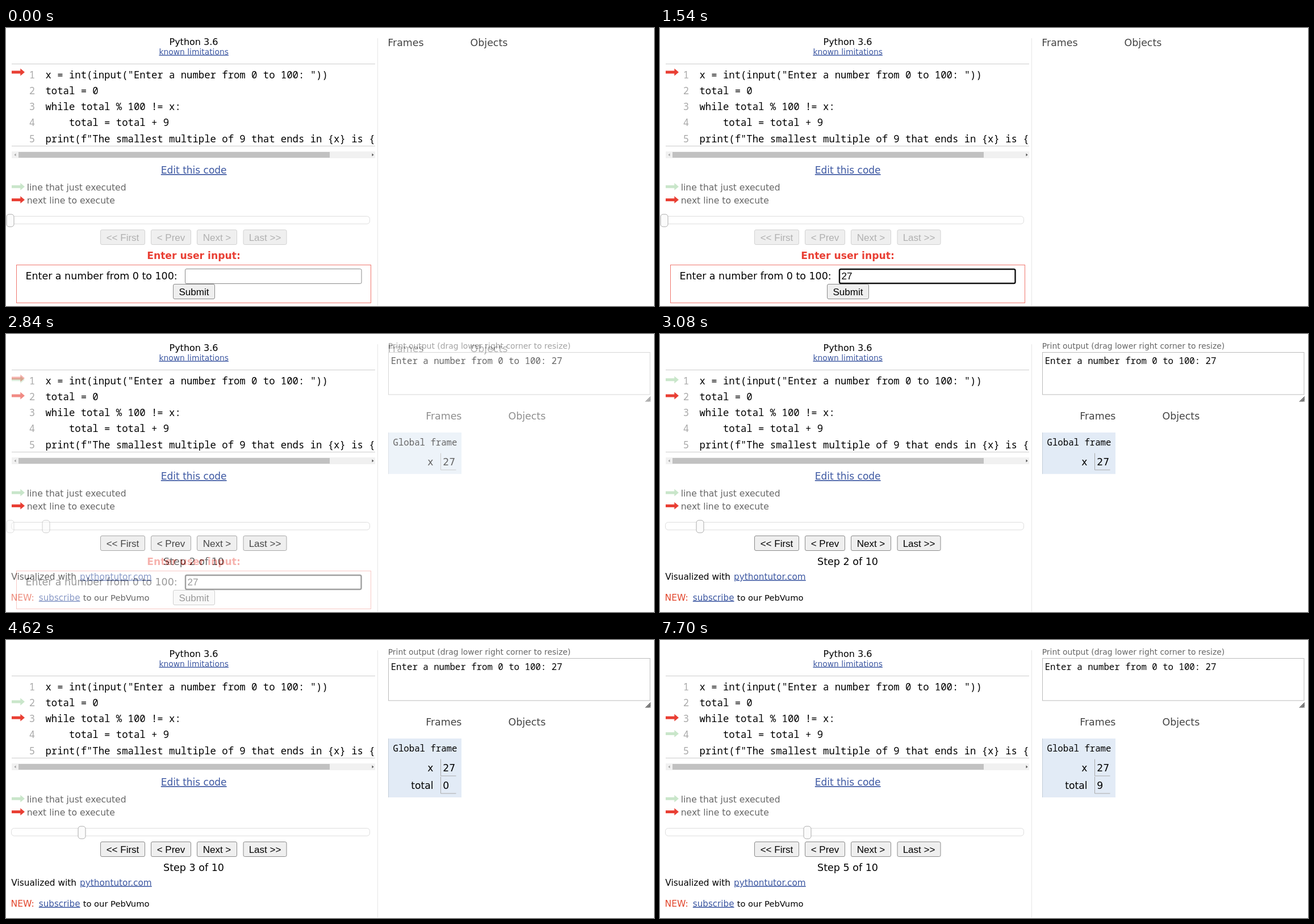
Write an HTML page that moves like this. It is 1141x491 px and loops after 8 s.

```html
<!DOCTYPE html>
<html lang="en">
<head>
<meta charset="utf-8">
<title>Stepping through a while loop</title>
<style>
  html, body { margin: 0; width: 100%; height: 100%; overflow: hidden; background: #fff; }
  svg { display: block; width: 1141px; height: 491px; }
  text { font-family: "DejaVu Sans", Verdana, sans-serif; white-space: pre; }
  .mono { font-family: "Noto Sans Mono", "DejaVu Sans Mono", monospace; }
  .ui { font-family: "Liberation Sans", Arial, sans-serif; }
  .link { fill: #3d58a2; text-decoration: underline; text-decoration-thickness: 1px; text-underline-offset: 1px; }
</style>
</head>
<body>
<svg id="stage" viewBox="0 0 1141 491"></svg>
<script>
const LOOP = 8000, FADE = 600, FADE_STEPS = 10;
const RED = '#e93f34', GREEN = '#c9e6ca', INK = '#000', GREY = '#666';

// One entry per state; "at" is when its cross-fade begins.
const scenes = [
  { at: 0, step: 1, next: 1 },
  { at: 1000, step: 1, next: 1, typed: '27' },
  { at: 2540, step: 2, done: 1, next: 2, vars: [['x', 27]] },
  { at: 4080, step: 3, done: 2, next: 3, vars: [['x', 27], ['total', 0]] },
  { at: 5620, step: 4, done: 3, next: 4, vars: [['x', 27], ['total', 0]] },
  { at: 7160, step: 5, done: 4, next: 3, vars: [['x', 27], ['total', 9]] }
];

const code = [
  'x = int(input("Enter a number from 0 to 100: "))',
  'total = 0',
  'while total % 100 != x:',
  '    total = total + 9',
  'print(f"The smallest multiple of 9 that ends in {x} is {'
];

const esc = s => String(s).replace(/&/g, '&amp;').replace(/</g, '&lt;');

const text = (x, y, size, str, fill = INK, attrs = '') =>
  `<text x="${x}" y="${y}" font-size="${size}" fill="${fill}" ${attrs}>${esc(str)}</text>`;

const rect = (x, y, w, h, fill, stroke = 'none', r = 0, lineWidth = 1) =>
  `<rect x="${x}" y="${y}" width="${w}" height="${h}" rx="${r}" fill="${fill}" stroke="${stroke}" stroke-width="${lineWidth}"/>`;

const path = (d, stroke, fill = 'none') =>
  `<path d="${d}" stroke="${stroke}" fill="${fill}"/>`;

const arrow = (y, fill) =>
  path(`M10 ${y - 2.5}h15.3v-3.9l7.7 6.4l-7.7 6.4v-3.9h-15.3z`, 'none', fill);

const MID = 'text-anchor="middle"', END = 'text-anchor="end"';
const MONO = 'class="mono"', LINK = 'class="link"';

function button(x, y, w, label, off) {
  return rect(x + .5, y + .5, w - 1, 26, '#efefef', off ? '#d2d2d2' : '#8a8a8a', 2.5) +
    text(x + w / 2, y + 19.5, 17, label, off ? '#b0b0b0' : INK, `class="ui" ${MID}`);
}

function codePanel(s) {
  let out = text(330.5, 30, 16, 'Python 3.6', INK, MID) +
    text(330.7, 46.5, 13.85, 'known limitations', '', `${LINK} ${MID}`) +
    path('M10 63.5H650M10 208.5H650', '#ccc');
  code.forEach((line, i) => {
    const y = Math.round(88.6 + i * 28.25);
    out += text(51, y, 17.28, i + 1, '#aaa', `${MONO} ${END}`) +
      text(69.5, y, 17.28, line, INK, MONO);
  });
  const lineY = n => 52.6 + n * 28.2;
  if (s.done) out += arrow(lineY(s.done), GREEN);
  out += arrow(s.step === 1 ? 78 : lineY(s.next), RED);
  return out +
    rect(10, 218, 640, 12, '#f1f1f1') + rect(22, 219, 548, 10, '#c1c1c1') +
    path('M17.5 221.5v5l-3-2.5z', 'none', '#a3a3a3') +
    path('M644.5 221.5v5l3-2.5z', 'none', '#505050') +
    text(330.7, 257, 17, 'Edit this code', '', `${LINK} ${MID}`) +
    arrow(280.2, GREEN) + text(36.7, 286.5, 15.6, 'line that just executed', GREY) +
    arrow(303.4, RED) + text(36.7, 310, 15.6, 'next line to execute', GREY);
}

function controls(s) {
  const off = s.step === 1;
  return rect(9.5, 332.5, 631, 13.5, '#fff', '#ddd', 5) +
    rect(1 + (s.step - 1) * 63, 329, 13, 22, '#fbfbfb', '#aaa', 4.5) +
    button(166, 356, 79, '<< First', off) +
    button(255, 356, 71, '< Prev', off) +
    button(336, 356, 71, 'Next >', off) +
    button(417.5, 356, 77, 'Last >>', off);
}

function inputForm(s) {
  const box = s.typed
    ? rect(316, 426, 309.5, 25, '#fff', '#101010', 2.5, 2.4) +
      text(319.5, 444, 17, s.typed, INK, 'class="ui"')
    : rect(315.5, 425.5, 310.5, 26, '#fff', '#8a8a8a', 2.5);
  return text(330.5, 408, 17.2, 'Enter user input:', RED, `font-weight="bold" ${MID}`) +
    rect(18.5, 418.5, 624, 67, 'none', '#f0776e') +
    text(34.5, 444, 17.45, 'Enter a number from 0 to 100:') +
    box + button(294, 452, 74, 'Submit');
}

function credits(s) {
  return text(330.5, 408, 17.5, `Step ${s.step} of 10`, INK, MID) +
    text(9.3, 433.5, 15.35, 'Visualized with') +
    text(130, 433.5, 15.27, 'pythontutor.com', '', LINK) +
    text(8.5, 470.5, 15.6, 'NEW:', '#e2472d') +
    text(57.8, 470.5, 15.15, 'subscribe', '', LINK) +
    text(135.7, 470.5, 14.7, 'to our PebVumo');
}

const headings = (x, y) =>
  text(x, y, 17.4, 'Frames', '#444') + text(x + 145.3, y, 17.4, 'Objects', '#444');

function memory(s) {
  const height = 42.5 + 30.75 * s.vars.length;
  let out = text(672.7, 25.5, 13.9, 'Print output (drag lower right corner to resize)', GREY) +
    rect(673.5, 32.5, 460.5, 74.5, '#fff', '#bbb') +
    text(677.7, 52.5, 15.72, `Enter a number from 0 to 100: ${s.vars[0][1]}`, INK, MONO) +
    path('M1135 110v9.5h-9.5z', 'none', '#8a8a8a') +
    path('M1126 119.5l9-9M1130 119.5l5-5', '#555') +
    headings(739.2, 150.5) +
    rect(673, 174, 129, height, '#e2ebf6') +
    path(`M673.5 174v${height}`, '#c3cdd8');
  out += text(681.5, 197, 15.7, 'Global frame', INK, MONO);
  s.vars.forEach(([name, value], i) => {
    const y = i * 31;
    out += text(752.5, 232 + y, 17.2, name, INK, END) +
      path(`M765.5 ${210.5 + y}v29.5h27`, '#aaa') +
      text(769.3, 232 + y, 17.2, value);
  });
  return out;
}

function draw(s) {
  return '<g>' + rect(0, 0, 1141, 491, '#fff') +
    path('M654.5 18V490', '#e6e6e6') +
    codePanel(s) + controls(s) +
    (s.vars ? credits(s) + memory(s) : inputForm(s) + headings(672.3, 31.5)) + '</g>';
}

const stage = document.getElementById('stage');
stage.innerHTML = scenes.map(draw).join('');

// Each later scene fades in over the one below it, in equal jumps.
scenes.slice(1).forEach(({ at }, i) => {
  stage.children[i + 1].animate([
    { opacity: 0, offset: 0 },
    { opacity: 0, offset: at / LOOP, easing: `steps(${FADE_STEPS}, start)` },
    { opacity: 1, offset: (at + FADE) / LOOP },
    { opacity: 1, offset: 1 }
  ], { duration: LOOP, iterations: Infinity });
});
</script>
</body>
</html>
```
